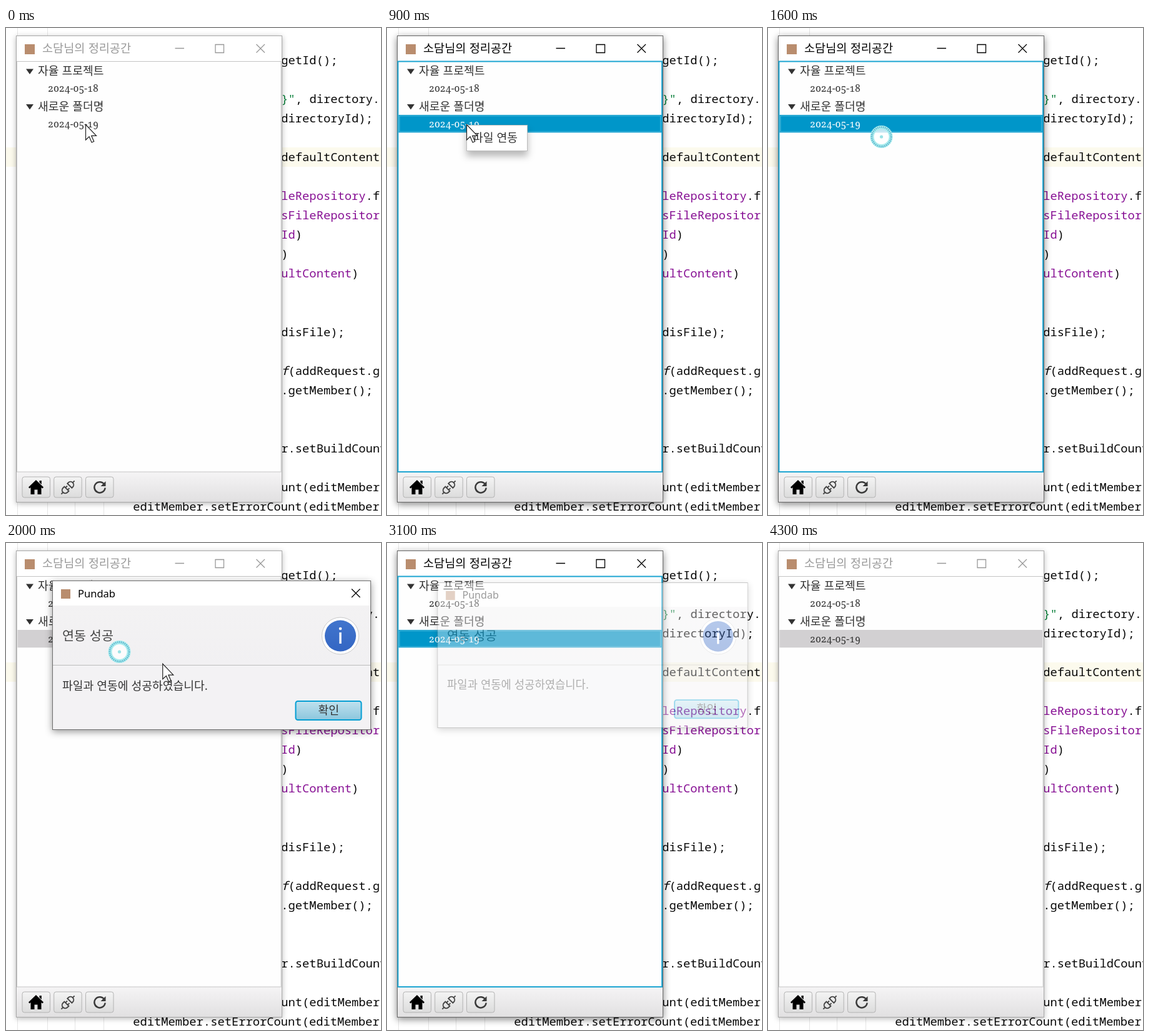
An HTML page for the animation above (4.4 s loop, 600 px wide and 779 px high).

```html
<!DOCTYPE html>
<html lang="ko">
<head>
<meta charset="utf-8">
<title>정리공간</title>
<style>
  html, body { margin: 0; width: 100%; height: 100%; overflow: hidden; background: #fff; }
  svg { display: block; }
  text { white-space: pre; font: 300 18.2px "Noto Sans CJK KR", "Noto Sans CJK", sans-serif; fill: #333; }
  .code text { font: 18.8px "Noto Sans Mono", monospace; fill: #080808; }
  .code .field { fill: #871094; }
  .code .str { fill: #067d37; }
  .code .it { font-style: italic; }
  .date { font: 15.4px "Noto Serif", serif; font-variant-numeric: oldstyle-nums; }
  .title { font-size: 18.6px; }
  .brand { font: 16.5px "Noto Sans", sans-serif; fill: #000; }
  .head { font-size: 20.7px; fill: #444; }
  .body { font-size: 18.2px; }
  .line { fill: none; stroke-width: 1.3; }
  #frame { fill: #fff; stroke: #a8a8a8; filter: drop-shadow(0 2px 4px rgba(0,0,0,.28)); }
  #chrome { stroke: #999; }
  #caption { fill: #999; }
  #pane { fill: #fefefe; stroke: #c4c4c4; }
  #row { fill: #d2d0d2; }
  #rowLine { stroke: none; }
  .active #frame { stroke: #666; filter: drop-shadow(0 3px 6px rgba(0,0,0,.48)); }
  .active #chrome { stroke: #000; }
  .active #caption { fill: #000; }
  .active #pane { stroke: #1da5d2; stroke-width: 2; }
  .active #row { fill: #0096c9; }
  .active #rowLine { stroke: #4db9dc; }
  .active.picked #lastDate { fill: #fff; }
  #menu .box { fill: #fff; stroke: #bdbdbd; filter: drop-shadow(0 8px 6px rgba(0,0,0,.28)); }
  #menu .item { fill: #fff; }
  #menu.hover .item { fill: #0096c9; }
  #menu.hover text { fill: #fff; }
  #dialog .box { fill: #f3f2f4; stroke: #6e6e6e; filter: drop-shadow(0 3px 6px rgba(0,0,0,.4)); }
</style>
</head>
<body>
<svg width="600" height="779" viewBox="0 0 600 779">
  <defs>
    <linearGradient id="bar" x2="0" y2="1"><stop stop-color="#f5f4f5"/><stop offset="1" stop-color="#e1e0e1"/></linearGradient>
    <linearGradient id="btn" x2="0" y2="1"><stop stop-color="#f4f4f4"/><stop offset="1" stop-color="#dcdcdc"/></linearGradient>
    <linearGradient id="header" x2="0" y2="1"><stop stop-color="#f3f2f3"/><stop offset="1" stop-color="#f1f0f2"/></linearGradient>
    <linearGradient id="ok" x2="0" y2="1"><stop stop-color="#bfe1ee"/><stop offset="1" stop-color="#8cc6dd"/></linearGradient>
    <linearGradient id="okHover" x2="0" y2="1"><stop stop-color="#d2edf6"/><stop offset="1" stop-color="#a5d7e9"/></linearGradient>
    <linearGradient id="blue" x2="0" y2="1"><stop stop-color="#4175cd"/><stop offset="1" stop-color="#3466c3"/></linearGradient>
  </defs>

  <rect width="600" height="779" fill="#fff"/>
  <rect y="191" width="600" height="31" fill="#fcfaed"/>
  <path d="M18.5 0V779M66.5 0V779M110.5 700V779M156.5 700V779" stroke="#e6e6e6"/>
  <g id="code" class="code"></g>

  <g id="win">
    <rect id="frame" x="16.5" y="12.5" width="425" height="746"/>
    <rect x="30" y="26" width="16" height="16" fill="#b98d6e"/>
    <text id="caption" class="title" x="58" y="39.3">소담님의 정리공간</text>
    <path id="chrome" class="line" d="M270.5 32.5H285M335 26.5H348.5V39.5H335ZM400.5 26L414 39.5M414 26L400.5 39.5"/>
    <rect x="17" y="710" width="424" height="48" fill="url(#bar)"/>
    <rect id="pane" x="17.5" y="53.5" width="422.5" height="656.5"/>
    <g id="pick">
      <rect id="row" x="18.5" y="139" width="420.5" height="28.3"/>
      <rect id="rowLine" x="20" y="140.5" width="417.5" height="25.3" fill="none"/>
    </g>
    <path d="M32 65.5H44L38 74ZM32 122H44L38 130.5Z" fill="#333"/>
    <text x="51" y="75">자율 프로젝트</text>
    <text class="date" x="67" y="102">2024-05-18</text>
    <text x="51" y="131.5">새로운 폴더명</text>
    <text id="lastDate" class="date" x="67" y="159">2024-05-19</text>
    <g fill="url(#btn)" stroke="#b3b3b3">
      <rect x="26" y="718" width="44.5" height="33" rx="3.5"/>
      <rect x="76.7" y="718" width="44.5" height="33" rx="3.5"/>
      <rect x="127.5" y="718" width="44.5" height="33" rx="3.5"/>
    </g>
    <path d="M48 723L60 734.5L58.5 736.5L56.5 735V746H50.5V738.5H45.500V746H39.5V735L37.5 736.5L36 734.5ZM53.5 724H56.8V730L53.5 727Z" fill="#000"/>
    <g transform="translate(99 735) rotate(-45)" fill="none" stroke="#444" stroke-width="1.9">
      <path d="M-15 0H-10M-3 -5H-6A5 5 0 0 0 -6 5H-3ZM-3 -2.5H1M-3 2.5H1M15 0H10M4 -5H6A5 5 0 0 1 6 5H4Z"/>
    </g>
    <path d="M157.5 730.5A8.6 8.6 0 1 0 158.6 735.5" fill="none" stroke="#3a3a3a" stroke-width="2.5"/>
    <path d="M159.5 725V733H151.5Z" fill="#3a3a3a"/>
  </g>

  <g id="menu">
    <rect class="box" x="127.5" y="155.5" width="97" height="41"/>
    <rect class="item" x="128" y="160.5" width="96" height="31"/>
    <text x="137" y="182">파일 연동</text>
  </g>

  <g id="dialog">
    <rect class="box" x="74.5" y="60.5" width="509" height="238"/>
    <rect x="75" y="61" width="508" height="39" fill="#fff"/>
    <rect x="75" y="100" width="508" height="95" fill="url(#header)"/>
    <path d="M75 195.5H583" stroke="#bcbcbc"/>
    <rect x="88" y="74" width="15" height="15" fill="#b98d6e"/>
    <text class="brand" x="115" y="87">Pundab</text>
    <path id="close" class="line" d="M553 73.5L566.5 87M566.5 73.5L553 87" stroke="#000"/>
    <text class="head" x="90" y="155.5">연동 성공</text>
    <circle cx="535" cy="148.5" r="29.5" fill="#fff" stroke="#c9c9c9"/>
    <circle cx="535" cy="148.5" r="25" fill="url(#blue)"/>
    <path d="M535 143V161" stroke="#fff" stroke-width="3.4"/>
    <circle cx="535" cy="137" r="2.3" fill="#fff"/>
    <text class="body" x="90" y="234.5">파일과 연동에 성공하였습니다.</text>
    <rect id="okBox" x="463.5" y="253" width="105" height="30" rx="3.5" stroke="#039ed3" stroke-width="2"/>
    <text class="body" x="499.5" y="274">확인</text>
  </g>

  <circle id="ripple" cx="127" cy="155" fill="none" stroke="#c4d3da" stroke-width="2"/>
  <g id="busy" transform="translate(181.5 174)">
    <circle r="15" fill="#fff" fill-opacity=".75" stroke="#a9ecee" stroke-width="6"/>
    <circle r="15.5" fill="none" stroke="#5fb4cc" stroke-width="3" stroke-dasharray="1.5 1.5"/>
    <circle r="2.6" fill="#9be3e6"/>
  </g>
  <path id="cursor" d="M0 0V24.5L5.6 19.3L9.6 28.5L13.2 27L9.2 17.8H17Z" fill="#fff" stroke="#222" stroke-width="1.2"/>
</svg>
<script>
const LOOP = 4400;
const $ = id => document.getElementById(id);
const clamp = v => Math.min(1, Math.max(0, v));
const span = (t, a, b) => clamp((t - a) / (b - a));
const smooth = p => p * p * (3 - 2 * p);
const show = (el, on) => el.setAttribute('visibility', on ? 'inherit' : 'hidden');

// [line number, text, class, text, class ...], starting at column 21
const code = [
  [0, 'getId();'],
  [2, '}"', 'str', ', directory.'],
  [3, 'directoryId);'],
  [5, 'defaultContent'],
  [7, 'leRepository', 'field', '.f'],
  [8, 'sFileRepositor', 'field'],
  [9, 'Id', 'field', ')'],
  [10, ')'],
  [11, 'ultContent', 'field', ')'],
  [14, 'disFile);'],
  [16, 'f', 'it', '(addRequest.g'],
  [17, '.getMember();'],
  [20, 'r.setBuildCount'],
  [22, 'unt(editMember'],
  [23, 'editMember.setErrorCount(editMember']
];
for (const [n, ...parts] of code) {
  const line = document.createElementNS('http://www.w3.org/2000/svg', 'text');
  line.setAttribute('x', n === 23 ? 203.2 : 440.3);
  line.setAttribute('y', 58 + 31.04 * n);
  for (let i = 0; i < parts.length; i += 2) {
    const run = document.createElementNS('http://www.w3.org/2000/svg', 'tspan');
    run.textContent = parts[i];
    if (parts[i + 1]) run.setAttribute('class', parts[i + 1]);
    line.append(run);
  }
  $('code').append(line);
}

// cursor legs: start, end, target
const legs = [
  [1000, 1300, 182, 172],
  [1835, 2400, 512, 274],
  [2900, 3090, 640, 230]
];
function cursorAt(t) {
  let x = 127.5, y = 154.5;
  for (const [a, b, tx, ty] of legs) {
    const p = smooth(span(t, a, b));
    x += (tx - x) * p;
    y += (ty - y) * p;
  }
  return [x, y];
}

function draw(t) {
  const picked = t >= 300;
  const active = (picked && t < 1850) || (t >= 3040 && t < 3600);
  $('win').setAttribute('class', (active ? 'active ' : '') + (picked ? 'picked' : ''));
  show($('pick'), picked);

  const [x, y] = cursorAt(t);
  const busy = t >= 1600 && t < 2050;
  $('cursor').setAttribute('transform', `translate(${x} ${y})`);
  show($('cursor'), !(busy && t < 1835));
  show($('busy'), busy);

  const r = span(t, 400, 600);
  $('ripple').setAttribute('r', 12 + 2 * r);
  $('ripple').setAttribute('opacity', 0.9 * (1 - r));
  show($('ripple'), t >= 400 && t < 600);

  show($('menu'), t >= 800 && t < 1550);
  $('menu').setAttribute('class', y > 160 ? 'hover' : '');

  const gone = t < 2500 ? 1 - span(t, 1850, 1960) : span(t, 3040, 3140);
  const scale = 1 - 0.0417 * gone;
  show($('dialog'), gone < 1);
  show($('close'), t < 3040);
  $('dialog').setAttribute('opacity', 1 - gone);
  $('dialog').setAttribute('transform', `translate(329 179) scale(${scale}) translate(-329 -179)`);
  const over = x > 463 && x < 569 && y > 253 && y < 283;
  $('okBox').setAttribute('fill', over ? 'url(#okHover)' : 'url(#ok)');
}

function tick() {
  draw(performance.now() % LOOP);
  requestAnimationFrame(tick);
}
tick();
</script>
</body>
</html>
```
